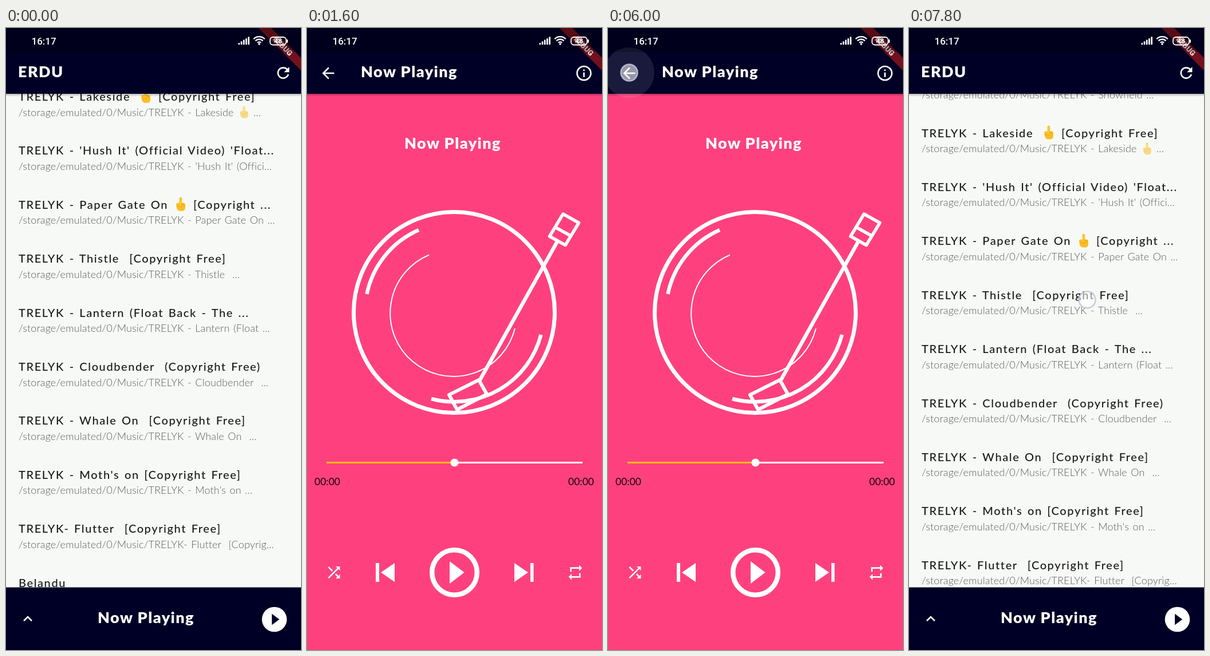
These frames come from a looping animation (515x1087 px, 8000 ms). An HTML page:

```html
<!DOCTYPE html>
<html lang="en">
<head>
<meta charset="utf-8">
<title>Music player</title>
<style>
  html, body { margin: 0; width: 100%; height: 100%; overflow: hidden; background: #000026; }
  svg { display: block; width: 100vw; height: 100vh; }
  text { white-space: pre; font-family: Lato, "Open Sans", sans-serif; }
  .head { font-size: 27px; font-weight: 900; letter-spacing: 1.45px; fill: #fff; }
  .song { font-size: 20px; font-weight: 500; letter-spacing: 1.6px; word-spacing: 2px; fill: #191a19; }
  .path { font-size: 18px; font-weight: 300; letter-spacing: .12px; word-spacing: 1.5px; fill: #5c5d5c; }
  .time { font-size: 17.5px; fill: #14060b; }
  .clock { font: 500 17px Roboto, sans-serif; fill: #fff; }
  .line { fill: none; stroke: #fff; }
</style>
</head>
<body>
<svg id="stage" viewBox="0 0 515 1087" preserveAspectRatio="none"></svg>
<script>
const LOOP = 8000, STEP = 200, ROW = 94.4;
const NAVY = '#000026', PINK = '#fe417e', PAPER = '#f7f9f6';
const ARTIST = 'TRELYK', DIR = '/storage/emulated/0/Music/';

// [title, path ending]; |x| puts a hand at that x
const songs = [
  ['- Snowfield  [Copyright Free]', '- Snowfield ...'],
  ['- Lakeside |233|[Copyright Free]', '- Lakeside |406|...'],
  ["- 'Hush It' (Official Video) 'Float...", "- 'Hush It' (Offici..."],
  ['- Paper Gate On |294|[Copyright ...', '- Paper Gate On ...'],
  ['- Thistle  [Copyright Free]', '- Thistle  ...'],
  ['- Lantern (Float Back - The ...', '- Lantern (Float ...'],
  ['- Cloudbender  (Copyright Free)', '- Cloudbender  ...'],
  ['- Whale On  [Copyright Free]', '- Whale On  ...'],
  ["- Moth's on [Copyright Free]", "- Moth's on ..."],
  ['- Flutter  [Copyright Free]', '- Flutter  [Copyrig...']
];

const text = (cls, x, y, s) => `<text class="${cls}" x="${x}" y="${y}">${s}</text>`;
const icon = (cx, cy, d, size = 1.31) =>
  `<path fill="#fff" transform="translate(${cx} ${cy}) scale(${size}) translate(-12 -12)" d="${d}"/>`;
const hand = (x, y, size, alpha) => `
  <g transform="translate(${x} ${y}) scale(${size})" opacity="${alpha}">
    <path d="M3 13q0-3 3-3h9q4 0 4 4v4q0 6-6 6h-3q-4 0-6-5z" fill="#fcbf22"/>
    <rect x="8.500" y="0" width="4.800" height="16" rx="2.400" fill="#fdc630"/>
    <path d="M13.500 10v5M16.500 11v4M5 16.500q5-2 8 1" fill="none" stroke="#e59a1a"/>
  </g>`;

function textLine(cls, start, y, body) {
  const [before, x, after] = body.split('|');
  const small = cls === 'path';
  let out = text(cls, 22, y, start + before);
  if (x) {
    out += small ? hand(+x, y - 17, .88, .55) : hand(+x, y - 20, 1, 1);
    out += text(cls, +x + (small ? 26 : 33), y, after);
  }
  return out;
}

function songRow([title, file], i) {
  const y = 127 + (i - 1) * ROW, gap = i === 9 ? '' : ' ';
  return textLine('song', ARTIST + gap, y, title) +
    textLine('path', DIR + ARTIST + gap, y + 26.5, file);
}

const appBar = `<rect width="515" height="115" fill="${NAVY}"/>
  <rect y="115" width="515" height="5" fill="url(#shade)"/>`;

const listPage = `
  <rect width="515" height="1087" fill="${PAPER}"/>
  <g clip-path="url(#window)"><g id="rows">
    ${songs.map(songRow).join('')}
    ${text('song', 22, 127 + 9 * ROW, 'Belandu')}
  </g></g>
  ${appBar}
  ${text('head', 21, 86, 'ERDU')}
  ${icon(484, 78.5, 'M17.65 6.35C16.2 4.9 14.21 4 12 4c-4.42 0-7.99 3.58-7.99 8s3.57 8 7.99 8c3.73 0 6.84-2.55 7.73-6h-2.08c-.82 2.33-3.04 4-5.65 4-3.31 0-6-2.69-6-6s2.69-6 6-6c1.66 0 3.14.69 4.22 1.78L13 11h7V4z')}
  <rect y="977.500" width="515" height="110" fill="${NAVY}"/>
  ${icon(38, 1032.5, 'M12 8l-6 6 1.41 1.41L12 10.83l4.59 4.58L18 14z')}
  ${text('head', 160, 1040, 'Now Playing')}
  ${icon(468.5, 1033.5, 'M12 2a10 10 0 1 0 0 20a10 10 0 1 0 0-20zM10 16.5v-9l6 4.5z', 2.18)}`;

const turntable = `
  <g class="line" stroke-width="6.500">
    <circle cx="257" cy="497" r="175.500" stroke-width="7"/>
    <path d="M195 353A156.500 156.500 0 0 0 104.500 465M408.500 536A156.500 156.500 0 0 1 217 648"/>
    <path d="M213 396.500A110.500 110.500 0 1 0 363 525" stroke-width="2"/>
    <path d="M437 373L302 615"/>
    <path d="M447 325l27.500 15.500-23.500 39-27.500-15.500zM433 348l28 15.500" stroke-width="5.500" stroke-linejoin="round"/>
    <path d="M248 641l52-26 14 25-52 27z" stroke-width="6" stroke-linejoin="round"/>
  </g>`;

const playerPage = `
  <rect width="515" height="1087" fill="${PINK}"/>
  ${appBar}
  <circle id="ripple" cx="37" cy="78" r="44" fill="#fff" opacity=".1"/>
  ${icon(37, 79, 'M20 11H7.83l5.59-5.59L12 4l-8 8 8 8 1.41-1.41L7.83 13H20z')}
  ${text('head', 94, 86, 'Now Playing')}
  <circle class="line" cx="483.500" cy="79" r="12" stroke-width="2.600"/>
  <path d="M482.200 72.400h2.600v2.600h-2.600zM482.200 77.700h2.600v8h-2.600z" fill="#fff"/>
  ${text('head', 170, 211, 'Now Playing')}
  ${turntable}
  <path class="line" d="M257 759.500H481" stroke-width="3"/>
  <path d="M34 759.500H257" stroke="#ffb716" stroke-width="3"/>
  <circle cx="257.500" cy="759.500" r="7" fill="#fff"/>
  ${text('time', 13, 798.5, '00:00')}${text('time', 456, 798.5, '00:00')}
  ${icon(47, 951.5, 'M10.59 9.17L5.41 4 4 5.41l5.17 5.17zM14.5 4l2.04 2.04L4 18.59 5.41 20 17.96 7.46 20 9.5V4zm.33 9.41l-1.41 1.41 3.13 3.13L14.5 20H20v-5.5l-2.04 2.04z')}
  <path d="M120 935h6v33h-6zM153 935v33l-24-16.500zM362 935v33l24-16.500zM390 935h5.500v33h-5.500zM249 932v39l25.500-19.500z" fill="#fff"/>
  <circle class="line" cx="257.500" cy="951.500" r="39.300" stroke-width="8.500"/>
  ${icon(468.5, 951.5, 'M7 7h10v3l4-4-4-4v3H5v6h2zm10 10H7v-3l-4 4 4 4v-3h12v-6h-2z')}`;

const bar = i => `<rect x="${405.5 + i * 4.2}" y="${26 - i * 2.7}" width="2.700" height="${3.3 + i * 2.7}" rx="1" fill="#fff"/>`;
const wifi = r => `<path d="M${442 - r * .72} ${29 - r * .72}a${r} ${r} 0 0 1 ${r * 1.44} 0"/>`;

const debugRibbon = `
  <g transform="translate(515 0) rotate(45)">
    <rect id="ribbon" x="-53" y="36.700" width="106" height="15.800"/>
    <text y="49.300" text-anchor="middle" style="font:900 13px Roboto,sans-serif" fill="#fff" fill-opacity=".9">DEBUG</text>
  </g>`;

const statusBar = `
  <rect width="515" height="42" opacity=".25"/>
  ${text('clock', 44.5, 28.5, '16:17')}
  ${[0, 1, 2, 3, 4].map(bar).join('')}
  <g class="line" stroke-width="2.300">${[4.5, 9, 13.5].map(wifi).join('')}</g>
  <circle cx="442" cy="28" r="1.800" fill="#fff"/>
  <rect class="line" x="461" y="16" width="28" height="13.500" rx="5" stroke-width="1.800"/>
  <rect x="490" y="20" width="2" height="6" rx="1" fill="#fff"/>
  <text x="475" y="27.300" text-anchor="middle" style="font:700 12px Roboto,sans-serif" fill="#fff">48</text>`;

document.getElementById('stage').innerHTML = `
  <defs>
    <linearGradient id="shade" x2="0" y2="1">
      <stop stop-opacity=".25"/><stop offset="1" stop-opacity="0"/>
    </linearGradient>
    <clipPath id="window"><rect y="115" width="515" height="863"/></clipPath>
  </defs>
  ${listPage}
  <g id="player">${playerPage}</g>
  ${debugRibbon}
  ${statusBar}
  <circle id="touch" r="14.500" fill="#fff" fill-opacity=".55" stroke="#c3c4d6" stroke-opacity=".85" stroke-width="2.500"/>`;

const $ = id => document.getElementById(id);
const rows = $('rows'), player = $('player'), ripple = $('ripple'), ribbon = $('ribbon'), touch = $('touch');
const within = (t, a, b) => t >= a && t < b;
const move = (el, x, y) => el.setAttribute('transform', `translate(${x} ${y})`);
const show = (el, on) => el.setAttribute('display', on ? 'inline' : 'none');

// the list is pulled down, then slows
function scrollAt(t) {
  if (t < 6800) return 0;
  if (t < 7000) return 9;
  const p = (t - 7000) / 800;
  return 25.8 + 37.8 * (1 - (1 - p) ** 2);
}

function touchAt(t) {
  if (within(t, 1000, 1400)) return [252, 1040];
  if (within(t, 5800, 6200)) return [37, 78];
  if (t < 6800) return null;
  if (t < 7000) return [340, 501];
  const p = (t - 7000) / 800;
  return [338 - 27 * p, 518 - 43 * p];
}

function draw(time) {
  const t = Math.floor((time % LOOP) / STEP) * STEP;
  const fading = t === 1400 || t === 6200;
  show(player, within(t, 1400, 6400));
  player.setAttribute('opacity', fading ? .39 : 1);
  move(player, 0, fading ? 44.5 : 0);
  show(ripple, within(t, 5800, 6400));
  ribbon.setAttribute('fill', fading ? '#951521' : '#73111d');
  move(rows, 0, scrollAt(t));
  const spot = touchAt(t);
  show(touch, spot);
  if (spot) move(touch, ...spot);
}

const begin = performance.now();
function tick() {
  draw(performance.now() - begin);
  requestAnimationFrame(tick);
}
tick();
</script>
</body>
</html>
```
